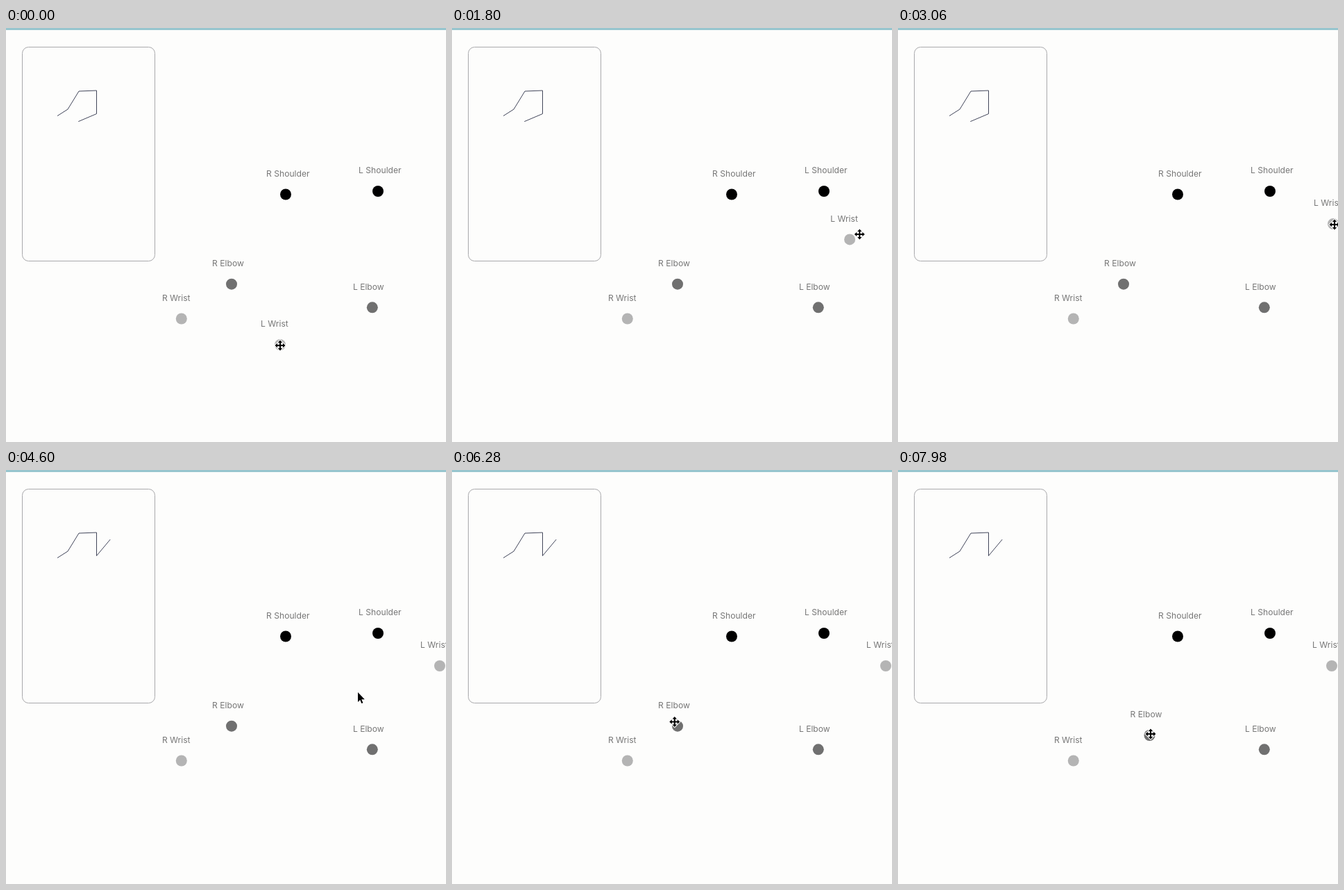
These frames come from a looping animation (634x596 px, 8000 ms). An HTML page with a canvas:

```html
<!DOCTYPE html>
<html lang="en">
<head>
<meta charset="utf-8">
<title>Pose editor</title>
<style>
  html, body { margin: 0; width: 100%; height: 100%; overflow: hidden; background: #fdfdfc; }
  canvas { display: block; }
</style>
</head>
<body>
<canvas id="stage" width="634" height="596"></canvas>
<script>
const ctx = document.getElementById('stage').getContext('2d');
const LOOP = 8000;
const BLACK = '#000', ELBOW = '#707070', WRIST = '#b4b4b4';
const clamp = p => Math.min(1, Math.max(0, p));

// Walks from a start point through legs of [from, to, x, y], times in ms.
function travel(t, [x, y], legs) {
  for (const [from, to, toX, toY] of legs) {
    const p = clamp((t - from) / (to - from));
    x += (toX - x) * p;
    y += (toY - y) * p;
  }
  return [x, y];
}

function joint(name, color, [x, y]) {
  ctx.fillStyle = color;
  ctx.beginPath();
  ctx.arc(x, y, 8, 0, 2 * Math.PI);
  ctx.fill();
  ctx.fillStyle = '#777';
  ctx.fillText(name, x - 27.9, y - 25.7);
}

function panel(t) {
  ctx.lineWidth = 1;
  ctx.strokeStyle = '#a9a9ac';
  ctx.beginPath();
  ctx.roundRect(23.5, 27.5, 191, 308, 9);
  ctx.stroke();

  // After the drop the left forearm swings up around its elbow.
  const p = clamp((t - 3640) / 300);
  const angle = 2.74 + 2.67 * p, r = 28.5 + 2.2 * p;
  const hand = [130.5 + r * Math.cos(angle), 123.5 + r * Math.sin(angle)];
  ctx.beginPath();
  for (const point of [[74, 126.5], [89, 117], [105, 91], [130.5, 90], [130.5, 123.5], hand]) {
    ctx.lineTo(...point);
  }
  ctx.strokeStyle = '#42465a';
  ctx.stroke();
}

function pointer(t) {
  const spot = travel(t, [395, 457], [
    [1100, 1840, 598, 288], [1840, 2680, 629, 283],
    [4200, 4600, 507.5, 320], [4600, 5000, 318, 341], [5000, 5580, 314, 343],
    [5860, 6420, 323, 369], [7440, 7980, 364, 380]
  ]);
  const arrow = t > 4240 && t < 5000;
  const shape = arrow
    ? [[0, 0], [0, 14], [3.2, 11], [5.3, 16], [7.4, 15.1], [5.3, 10.2], [9.8, 10.2]]
    : [[-1, -1], [-1, -4], [-3.2, -4], [0, -7.5], [3.2, -4], [1, -4], [1, -1]];
  ctx.save();
  ctx.translate(...spot);
  ctx.beginPath();
  // The move cursor repeats one arm in four directions.
  for (let i = 0; i < (arrow ? 1 : 4); i++) {
    shape.forEach(point => ctx.lineTo(...point));
    ctx.rotate(Math.PI / 2);
  }
  ctx.closePath();
  ctx.lineJoin = 'round';
  ctx.lineWidth = 2;
  ctx.strokeStyle = '#fff';
  ctx.stroke();
  ctx.fillStyle = BLACK;
  ctx.fill();
  ctx.restore();
}

function draw(t) {
  ctx.fillStyle = '#fdfdfc';
  ctx.fillRect(0, 0, 634, 596);
  ctx.fillStyle = '#97c5ce';
  ctx.fillRect(0, 0, 634, 3);
  panel(t);
  ctx.font = '12.1px Inter, sans-serif';
  joint('R Shoulder', BLACK, [403, 239.5]);
  joint('L Shoulder', BLACK, [536, 235]);
  joint('R Elbow', ELBOW, travel(t, [325, 368.7], [[7440, 7980, 362.5, 382]]));
  joint('L Elbow', ELBOW, [527.8, 402.3]);
  joint('R Wrist', WRIST, [252.8, 418.5]);
  joint('L Wrist', WRIST, travel(t, [395, 456], [
    [1100, 1840, 583, 296], [1840, 2680, 627, 282], [3640, 3680, 625, 282]
  ]));
  pointer(t);
}

const start = performance.now();
function frame() {
  draw((performance.now() - start) % LOOP);
  requestAnimationFrame(frame);
}
frame();
</script>
</body>
</html>
```
